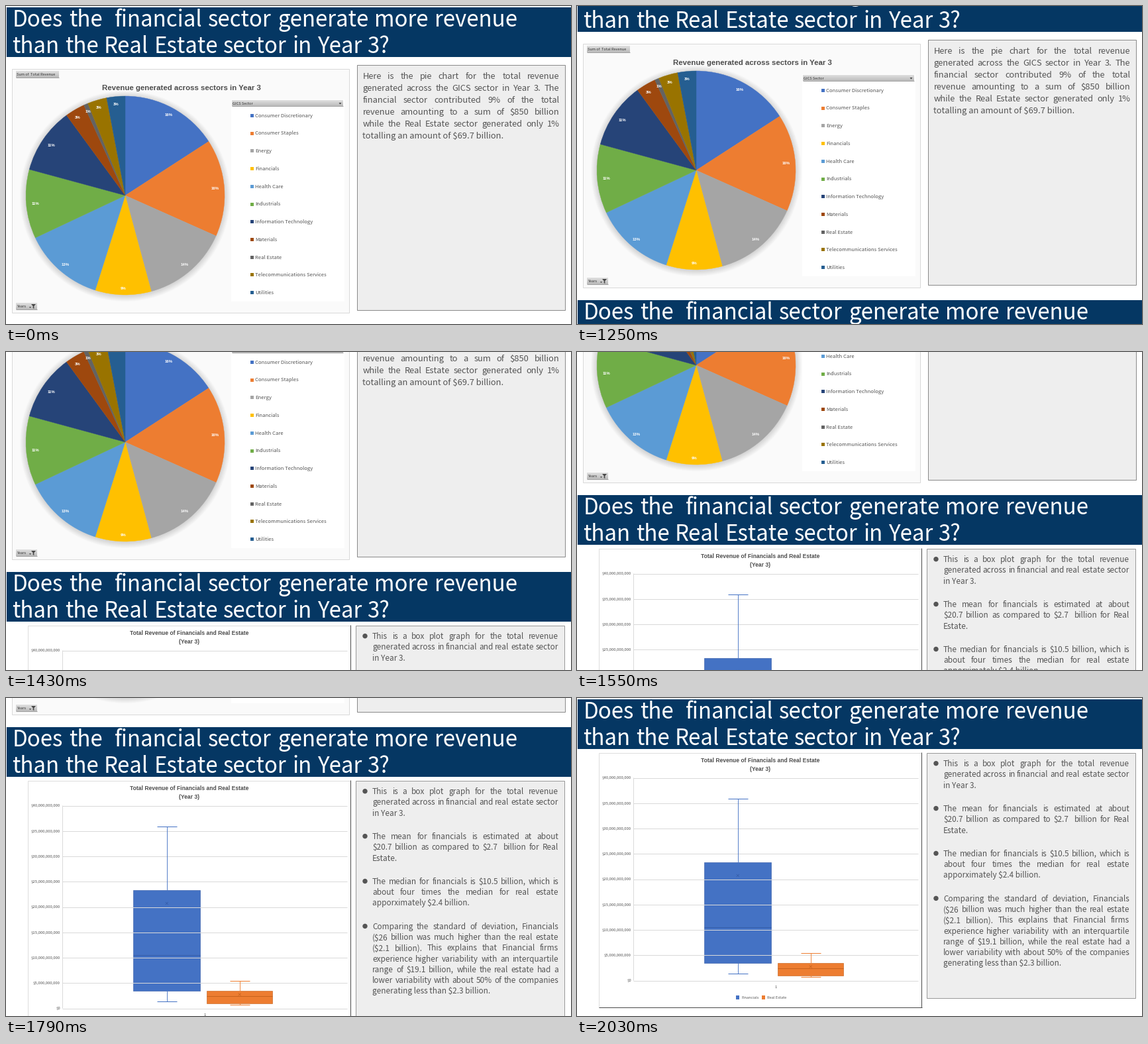
Write a matplotlib script that moves like this. It is 853 px wide and 480 px high and loops after 3230 ms.

```python
import numpy as np
import matplotlib.pyplot as plt
from matplotlib.animation import FuncAnimation
from matplotlib.patches import Circle, Polygon, Rectangle, Wedge

W, H, DPI = 853, 480, 64  # a power of two keeps the pixel size exact
LOOP, TICK = 3230, 10
SCROLL_AT, STEP, SCROLL_TIME = 1130, 60, 910

NAVY, PANEL, INK = "#053763", "#eeeeee", "#555555"
BLUE, ORANGE = "#4472c4", "#ed7d31"
SANS, BOLD = "Noto Sans CJK JP", "Liberation Sans"

SECTORS = [
    ("Consumer Discretionary", BLUE, 57.1, "16%", (246, 164)),
    ("Consumer Staples", ORANGE, 114, "16%", (316, 275)),
    ("Energy", "#a5a5a5", 164.8, "14%", (270, 390)),
    ("Financials", "#ffc000", 197.6, "9%", (177, 426)),
    ("Health Care", "#5b9bd5", 244.8, "13%", (90, 390)),
    ("Industrials", "#70ad47", 285.2, "11%", (44, 298)),
    ("Information Technology", "#264478", 323.8, "11%", (68, 210)),
    ("Materials", "#9e480e", 335.4, "3%", (108, 168)),
    ("Real Estate", "#636363", 337.9, "1%", (124, 159)),
    ("Telecommunications Services", "#997300", 349.2, "3%", (140, 153)),
    ("Utilities", "#255e91", 360, "3%", (166.5, 147.5)),
]

HEADING = [("Does the  financial sector generate more revenue", 772),
           ("than the Real Estate sector in Year 3?", 579)]

PIE_NOTE = """Here is the pie chart for the total revenue
generated across the GICS sector in Year 3. The
financial sector contributed 9% of the total
revenue amounting to a sum of $850 billion
while the Real Estate sector generated only 1%
totalling an amount of $69.7 billion."""

BOX_NOTES = ["""This is a box plot graph for the total revenue
generated across in financial and real estate sector
in Year 3.""",
             """The mean for financials is estimated at about
$20.7 billion as compared to $2.7  billion for Real
Estate.""",
             """The median for financials is $10.5 billion, which is
about four times the median for real estate
apporximately $2.4 billion.""",
             """Comparing the standard of deviation, Financials
($26 billion was much higher than the real estate
($2.1 billion). This explains that Financial firms
experience higher variability with an interquartile
range of $19.1 billion, while the real estate had a
lower variability with about 50% of the companies
generating less than $2.3 billion."""]

fig = plt.figure(figsize=(W / DPI, H / DPI), dpi=DPI, facecolor="white")
ax = fig.add_axes([0, 0, 1, 1])


def px(size):
    return size * 72 / DPI


def text(x, y, s, size, color=INK, ha="left", bold=False):
    """Write s with the middle of its capitals at y."""
    return ax.text(x, y + 0.36 * size, s, fontsize=px(size), color=color, ha=ha,
                   va="baseline", family=BOLD if bold else SANS,
                   weight="bold" if bold else "normal", parse_math=False)


def justify(x0, x1, y, line, size, color=INK):
    words = [text(x0, y, w, size, color) for w in line.split(" ")]
    widths = [w.get_window_extent().width if w.get_text() else 0 for w in words]
    gap = (x1 - x0 - sum(widths)) / (len(words) - 1)
    x = x0
    for word, width in zip(words, widths):
        word.set_x(x)
        x += width + gap


def paragraph(x0, x1, y, body, size, leading):
    lines = body.split("\n")
    for i, line in enumerate(lines[:-1]):
        justify(x0, x1, y + i * leading, line, size)
    text(x0, y + (len(lines) - 1) * leading, lines[-1], size)


def rect(x0, y0, x1, y1, fill, edge="none", width=1):
    ax.add_patch(Rectangle((x0, y0), x1 - x0, y1 - y0, facecolor=fill,
                           edgecolor=edge, lw=px(width) if edge != "none" else 0))


def line(x0, y0, x1, y1, color, width=1):
    ax.plot([x0, x1], [y0, y1], color=color, lw=px(width), solid_capstyle="butt")


def button(x0, y0, x1, y1):
    for y in range(y0, y1):
        shade = 0.87 - 0.15 * (y - y0) / (y1 - y0)
        rect(x0, y, x1, y + 1, str(shade))
    line(x0, y1 - 0.5, x1, y1 - 0.5, "#a2a2a2")


def heading():
    rect(1, 2, W, 77, NAVY)
    for i, (s, right) in enumerate(HEADING):
        justify(9.5, right, 19 + 40 * i, s, 33, "white")


def pie_slide():
    heading()
    rect(9.5, 94.5, 518.5, 462.5, "#fafafa", "#d9d9d9")
    rect(340, 141, 511, 446, "white")
    button(15, 98, 80, 108)
    text(16.5, 103, "Sum of  Total Revenue", 5.6, "#333333")
    text(264.5, 122.5, "Revenue generated across sectors in Year 3", 11.4,
         "#4d4d4d", "center", True)

    for r in np.arange(159, 150, -1):
        ax.add_patch(Circle((180, 287), r, color="black", alpha=0.014, lw=0))
    start = 0
    for i, (name, color, end, share, spot) in enumerate(SECTORS):
        ax.add_patch(Wedge((180, 286), 150, start - 90, end - 90,
                           facecolor=color, edgecolor=color, lw=px(0.4)))
        start = end
        text(*spot, share, 6, "white", "center", True)
        y = 165 + 26.72 * i
        rect(369, round(y) - 2, 374, round(y) + 3, color)
        text(376, y, name, 7.7)

    button(341, 142, 509, 151)
    text(342, 146.5, "GICS Sector", 5.6, "#333333")
    ax.add_patch(Polygon([(502.5, 146), (506.5, 146), (504.5, 148.5)],
                         color="#444444", lw=0))
    button(15, 448, 47, 458)
    text(16.5, 453, "Years", 5.6, "#333333")
    ax.add_patch(Polygon([(35, 454), (38, 454), (36.5, 456)], color="#444444", lw=0))
    ax.add_patch(Polygon([(38, 450), (45, 450), (42.3, 453), (42.3, 457),
                          (40.7, 456), (40.7, 453)], color="#444444", lw=0))

    rect(530.5, 88.5, 844.5, 458.5, PANEL, "#8a8a8a")
    paragraph(538.5, 835.5, 105.2, PIE_NOTE, 12.9, 18)


def box(x0, x1, top, q3, median, q1, low, mean, color, dark):
    mid = (x0 + x1) / 2
    line(mid, top, mid, q3, color, 0.9)
    line(mid, q1, mid, low, color, 0.9)
    for y in (top, low):
        line(mid - 15, y, mid + 15, y, color)
    rect(x0, q3, x1, q1, color, dark, 0.6)
    line(x0, median, x1, median, dark, 0.9)
    for s in (-2, 2):
        line(mid - 2, mean - s, mid + 2, mean + s, dark, 0.7)


def box_slide():
    heading()
    rect(33.5, 82.5, 520.5, 466.5, "white", "#dddddd")
    line(520.5, 82, 520.5, 467, "#4a4a4a")
    line(33, 466.5, 521, 466.5, "#4a4a4a")
    text(276.5, 93.5, "Total Revenue of Financials and Real Estate", 8.55,
         "#4d4d4d", "center", True)
    text(276.5, 106.5, "(Year 3)", 8.55, "#4d4d4d", "center", True)

    for i in range(9):
        y = 120.3 + 38.22 * i
        amount = 40 - 5 * i
        label = f"${amount},000,000,000" if amount else "$0"
        line(85, int(y) + 0.5, 515, int(y) + 0.5, "#d9d9d9")
        text(82, y, label, 6, ha="right")
    line(85.5, 120, 85.5, 426, "#d9d9d9")

    box(192.5, 293, 151.5, 247.5, 345.5, 399.5, 415.5, 268, BLUE, "#345ba6")
    box(303, 402.5, 384.5, 399.5, 407.5, 418.5, 421, 405.5, ORANGE, "#c4611c")

    text(300.5, 435.5, "1", 6, ha="center")
    for x, name, color in ((240, "Financials", BLUE), (279, "Real Estate", ORANGE)):
        rect(x, 449, x + 5.5, 455, color)
        text(x + 8, 452, name, 5.6)

    rect(528.5, 82.5, 843.5, 452.5, PANEL, "#999999")
    for i, note in enumerate(BOX_NOTES):
        y = 99 + 67.9 * i
        ax.add_patch(Circle((542, y - 0.3), 3.7, color=INK, lw=0))
        paragraph(553, 834, y, note, 11.8, 16.2)


def render(slide):
    ax.clear()
    ax.set(xlim=(0, W), ylim=(H, 0))
    ax.axis("off")
    slide()
    fig.canvas.draw()
    return np.array(fig.canvas.buffer_rgba())[..., :3]


def ease(u):
    return 2 * u * u if u < 0.5 else 1 - 2 * (1 - u) ** 2


page = np.vstack([render(pie_slide), render(box_slide)])
ax.remove()
view = fig.figimage(page[:H])


def update(i):
    t = i * TICK
    steps = 0 if t < SCROLL_AT else (t - SCROLL_AT) // STEP + 1
    top = round(H * ease(min(steps * STEP / SCROLL_TIME, 1)))
    view.set_data(page[top:top + H])
    return [view]


anim = FuncAnimation(fig, update, frames=LOOP // TICK, interval=TICK,
                     repeat=True, repeat_delay=0)
plt.show()
```
